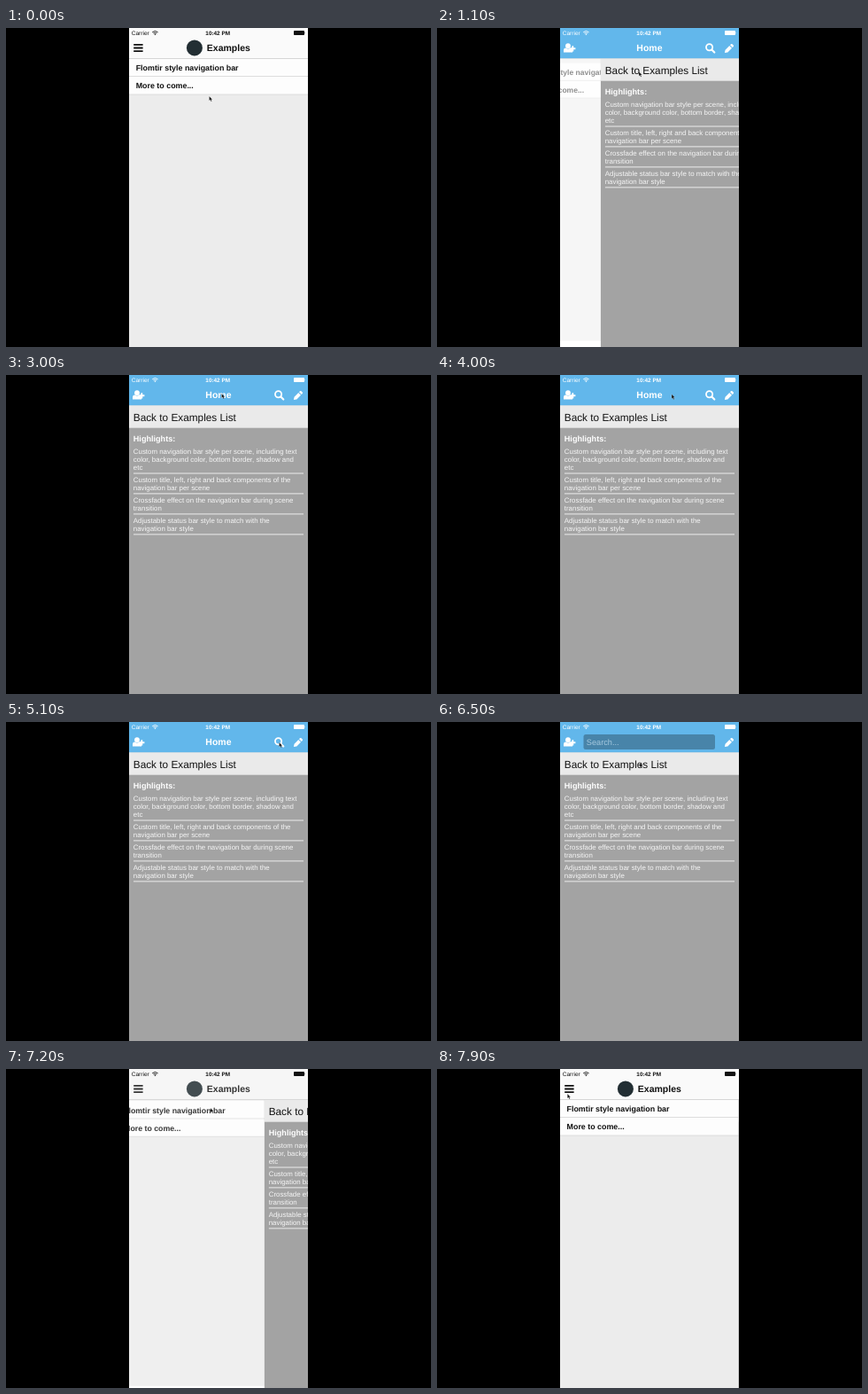
An HTML page for the animation above (8000 ms loop, 480 by 360 pixels).

```html
<!DOCTYPE html>
<html lang="en">
<head>
<meta charset="utf-8">
<title>Navigation bar demo</title>
<style>
  html, body { margin: 0; width: 100%; height: 100%; overflow: hidden; background: #000; }
  svg { display: block; width: 100%; height: 100%; }
  text { font-family: "Liberation Sans", Arial, sans-serif; text-rendering: geometricPrecision; }
  .bold { font-weight: bold; }
  .row { font-size: 8.9px; font-weight: bold; fill: #111; }
  .title { font-size: 10.5px; font-weight: bold; }
  .note { font-size: 7.9px; fill: #f6f6f6; }
</style>
</head>
<body>
<svg viewBox="0 0 480 360">
  <defs>
    <clipPath id="phone"><rect x="139" width="202" height="360"/></clipPath>
    <clipPath id="fieldClip"><rect id="fieldMask" y="14" height="17"/></clipPath>
  </defs>
  <rect width="480" height="360"/>
  <g clip-path="url(#phone)">
    <rect x="139" width="202" height="360" fill="#fff"/>

    <g id="list">
      <rect x="139" width="202" height="360" fill="#ececec"/>
      <rect x="139" y="34" width="202" height="41" fill="#fdfdfd"/>
      <path d="M139 54.5H341M139 75H341" stroke="#d6d6d6" stroke-width=".8"/>
      <text class="row" x="146.7" y="48">Flomtir style navigation bar</text>
      <text class="row" x="146.7" y="68.2">More to come...</text>
    </g>

    <g id="home">
      <rect x="139" width="203" height="360" fill="#a3a3a3"/>
      <rect x="139" y="34" width="203" height="25.7" fill="#eaeaea"/>
      <text x="143.8" y="51.6" font-size="11.8" fill="#111">Back to Examples List</text>
      <text class="bold" x="143.8" y="74.6" font-size="9.1" fill="#fff">Highlights:</text>
      <g id="notes"></g>
    </g>

    <rect x="139" width="202" height="34.5" fill="#e8e8e8"/>
    <g id="lightBar">
      <rect x="139" width="202" height="34.5" fill="#fafafa"/>
      <path d="M139 34.5H341" stroke="#cfcfcf" stroke-width=".8"/>
      <path d="M144.2 18.9H154.6M144.2 22.5H154.6M144.2 26.1H154.6" stroke="#111" stroke-width="1.8"/>
      <circle cx="212.9" cy="22.4" r="9" fill="#222e33"/>
      <text class="title" x="226.8" y="26.4" fill="#111">Examples</text>
    </g>

    <g id="blueBar">
      <rect x="139" width="202" height="34.2" fill="#62b7eb"/>
      <g fill="#fff">
        <circle cx="148" cy="20.2" r="2.9"/>
        <path d="M143 27.6V25.4Q143 22.6 145.4 22.5Q148 24.5 150.6 22.5Q153 22.6 153 25.4V27.6Z"/>
        <path d="M153.3 20.2V26.4M150.4 23.3H156.4" stroke="#fff" stroke-width="1.9"/>
        <path d="M324.9 28.1L325.6 24.7L330.3 20L333 22.7L328.3 27.4ZM331 19.3L332.2 18.1Q332.9 17.6 333.6 18.3L334.8 19.5Q335.4 20.2 334.8 20.9L333.7 22Z"/>
      </g>
      <g id="homeTitle" fill="#fff">
        <text class="title" x="239.9" y="26.4" text-anchor="middle">Home</text>
        <circle cx="307.6" cy="21.7" r="3.6" fill="none" stroke="#fff" stroke-width="1.8"/>
        <path d="M310.3 24.5L313.3 27.5" stroke="#fff" stroke-width="2.2" stroke-linecap="round"/>
      </g>
      <g id="field">
        <rect id="fieldBox" y="14" height="17" rx="2.5" fill="#4884a9"/>
        <g clip-path="url(#fieldClip)">
          <text id="hint" y="25.8" font-size="9.2" fill="#a6c9df">Search...</text>
        </g>
      </g>
    </g>

    <g id="status">
      <text x="141.8" y="7.8" font-size="6.5">Carrier</text>
      <text class="bold" x="239.2" y="7.8" font-size="6.4" text-anchor="middle">10:42 PM</text>
      <g fill="none" stroke="currentColor" stroke-width=".9">
        <path d="M165.2 4.8Q168.4 2 171.6 4.8M166.5 6.1Q168.4 4.5 170.3 6.1"/>
      </g>
      <circle cx="168.4" cy="7.3" r=".8"/>
      <rect x="325" y="3" width="12" height="5" rx=".8"/>
      <path d="M337.6 4.5Q338.7 5.5 337.6 6.5Z"/>
    </g>
  </g>
  <path id="cursor" d="M0 0V5.1L1.2 4L2.1 6L3 5.6L2.1 3.7H3.6Z" fill="#111" stroke="#fff" stroke-opacity=".55" stroke-width=".4"/>
</svg>
<script>
  const LOOP = 8000, WIDTH = 202;
  const PUSH = 850, POP = 6960, SEARCH = 5300;
  const $ = id => document.getElementById(id);
  const clamp = v => Math.min(1, Math.max(0, v));
  const smooth = v => v * v * (3 - 2 * v);
  const set = (id, attrs) => {
    for (const key in attrs) $(id).setAttribute(key, attrs[key]);
  };

  const notes = [
    [88.5, "Custom navigation bar style per scene, including text",
      "color, background color, bottom border, shadow and", "etc"],
    [120.5, "Custom title, left, right and back components of the", "navigation bar per scene"],
    [143.5, "Crossfade effect on the navigation bar during scene", "transition"],
    [166.5, "Adjustable status bar style to match with the", "navigation bar style"]
  ];
  $("notes").innerHTML = notes.map(([y, ...lines]) => {
    const text = lines.map((s, i) =>
      `<text class="note" x="143.8" y="${y + i * 9.1}">${s}</text>`).join("");
    const rule = y + lines.length * 9.1 - 4.8;
    return text + `<path d="M144 ${rule}H336" stroke="#f4f4f4" stroke-width=".9"/>`;
  }).join("");

  // time, x, y of the pointer tip
  const path = [
    [0, 229.5, 77], [100, 229.5, 77], [500, 228, 47], [1000, 228, 47],
    [1400, 228, 61], [1800, 228, 61], [2800, 243.5, 21], [3500, 243.5, 21],
    [4800, 308.5, 23], [5500, 308.5, 23], [6300, 229, 46], [6960, 229, 46],
    [7200, 231, 44], [7800, 147.3, 28], [LOOP, 147.3, 28]
  ];
  function pointer(t) {
    const i = Math.max(1, path.findIndex(k => k[0] > t));
    const [a, b] = [path[i - 1], path[i]];
    const s = smooth((t - a[0]) / (b[0] - a[0]));
    return [a[1] + (b[1] - a[1]) * s, a[2] + (b[2] - a[2]) * s];
  }

  // Overdamped spring from 0 to 1
  function spring(ms) {
    if (ms <= 0) return 0;
    const slow = 0.0067, fast = slow * 5.5;
    const rest = (fast * Math.exp(-slow * ms) - slow * Math.exp(-fast * ms)) / (fast - slow);
    return rest < 0.002 ? 1 : 1 - rest;
  }

  function draw(t) {
    const p = t < POP ? spring(t - PUSH) : 1 - spring(t - POP);
    const scale = 1 - 0.05 * p;
    set("list", {
      transform: `translate(${240 - 0.3 * WIDTH * p} 180) scale(${scale}) translate(-240 -180)`,
      opacity: 1 - 0.7 * p
    });
    set("home", { transform: `translate(${WIDTH * (1 - p)} 0)` });
    set("lightBar", { opacity: 1 - 0.7 * p });
    set("blueBar", { opacity: clamp((p - 0.25) / 0.5) });

    const ink = p > 0.5 ? "#fff" : "#111";
    set("status", { fill: ink, color: ink });

    const open = smooth(clamp((t - SEARCH) / 350));
    const width = 148.5 * open, left = 314 - width;
    set("fieldBox", { x: left, width });
    set("fieldMask", { x: left, width });
    set("hint", { x: left + 3.3 });
    set("field", { opacity: open > 0 ? 1 : 0 });
    set("homeTitle", { opacity: 1 - open });

    set("cursor", { transform: `translate(${pointer(t).join(" ")})` });
  }

  const start = performance.now();
  function tick(now) {
    draw(Math.max(0, now - start) % LOOP);
    requestAnimationFrame(tick);
  }
  draw(0);
  requestAnimationFrame(tick);
</script>
</body>
</html>
```
